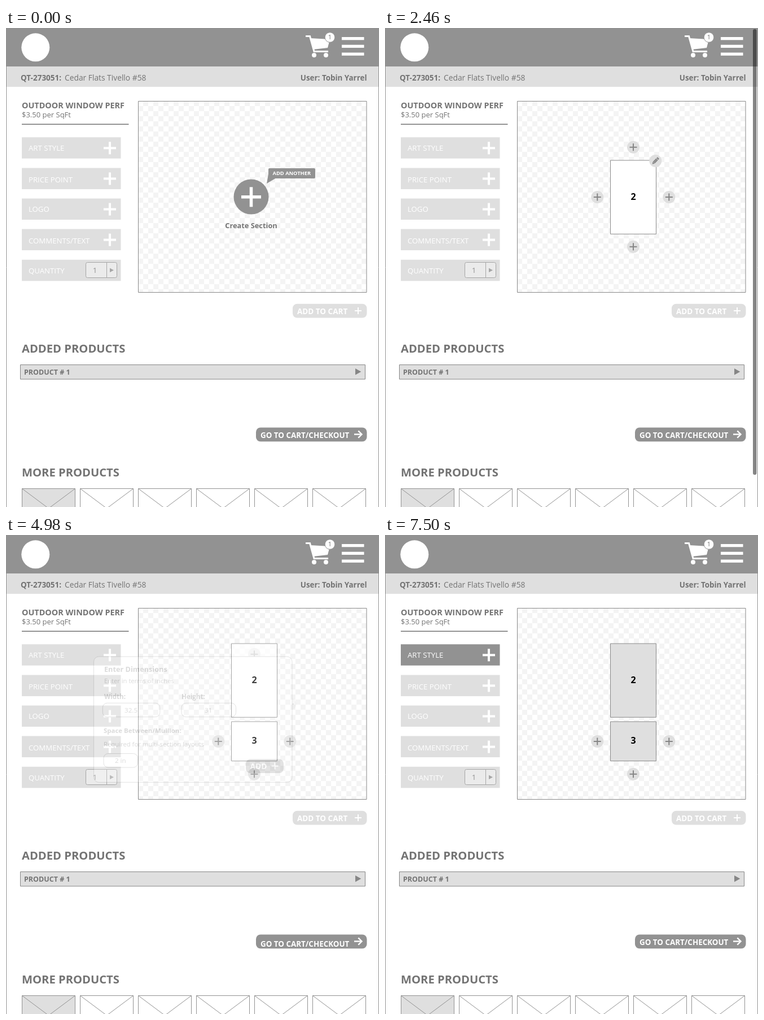
An HTML page with a canvas for the animation above (7.99 s loop, 661 by 847 pixels).

```html
<!DOCTYPE html>
<html lang="en">
<head>
<meta charset="utf-8">
<title>Product builder</title>
<style>
  html, body { margin: 0; width: 100%; height: 100%; overflow: hidden; background: #fff; }
  canvas { display: block; }
</style>
</head>
<body>
<canvas id="stage" width="661" height="847"></canvas>
<script>
const W = 661, H = 847, LOOP = 7990, STEP = 70;
const GREY = '#929292', LIGHT = '#dfdfdf', INK = '#737373', WHITE = '#fff';
const FONT = '"Open Sans", "Noto Sans", sans-serif';
const stage = document.getElementById('stage').getContext('2d');
let c;

// y is the middle of the capital letters
function text(str, x, y, size, { bold = false, color = INK, align = 'left' } = {}) {
  c.font = `${bold ? 700 : 400} ${size}px ${FONT}`;
  c.textAlign = align;
  c.fillStyle = color;
  c.fillText(str, x, y + size * 0.357);
}

function box(x, y, w, h, fill, stroke, r = 0) {
  c.beginPath();
  c.roundRect(x, y, w, h, r);
  if (fill) { c.fillStyle = fill; c.fill(); }
  if (stroke) { c.strokeStyle = stroke; c.lineWidth = 1; c.stroke(); }
}

function disc(x, y, r, fill, stroke) {
  box(x - r, y - r, 2 * r, 2 * r, fill, stroke, r);
}

function shape(points, fill) {
  c.beginPath();
  points.forEach(([x, y]) => c.lineTo(x, y));
  c.closePath();
  c.fillStyle = fill;
  c.fill();
}

function line(points, color, width) {
  c.beginPath();
  points.forEach(([x, y]) => c.lineTo(x, y));
  c.strokeStyle = color;
  c.lineWidth = width;
  c.stroke();
}

function plus(x, y, size, width, color = WHITE) {
  const h = size / 2;
  line([[x - h, y], [x + h, y]], color, width);
  line([[x, y - h], [x, y + h]], color, width);
}

function cart() {
  line([[531, 14.5], [538.5, 14.5], [546, 41.5], [571, 41.5]], WHITE, 3);
  shape([[539, 18], [574, 20], [570, 35], [544, 38]], WHITE);
  disc(546, 48, 4, WHITE);
  disc(567, 48, 4, WHITE);
  disc(574, 16.5, 8.8, WHITE, GREY);
  text('1', 574, 16.5, 11, { align: 'center' });
}

function header() {
  box(0, 0, W, 68, GREY);
  box(0, 68, W, 36, LIGHT);
  disc(52.3, 34.3, 25, WHITE);
  cart();
  for (const y of [16, 29.7, 43.4]) box(595, y, 39.5, 5.3, WHITE);
  text('QT-273051:', 26, 88, 13.5, { bold: true });
  text('Cedar Flats Tivello #58', 104, 88, 13.8);
  text('User: Tobin Yarrel', 639.5, 88, 13.4, { bold: true, align: 'right' });
}

function options(active) {
  text('OUTDOOR WINDOW PERF', 28, 137, 14.4, { bold: true });
  text('$3.50 per SqFt', 28, 153.5, 13);
  line([[28, 170.3], [217.5, 170.3]], INK, 1.6);
  ['ART STYLE', 'PRICE POINT', 'LOGO', 'COMMENTS/TEXT', 'QUANTITY'].forEach((name, i) => {
    const y = 193.3 + i * 54.1;
    box(28, y, 175.5, 37.5, active && i === 0 ? GREY : LIGHT);
    text(name, 40, y + (i % 2 ? 20.5 : 19) + (i === 4 ? 1 : 0), 13.2, { color: WHITE });
    if (i < 4) plus(184, y + 19, 22, 4);
  });
  box(141.5, 414.5, 55, 27, '#ebebeb', '#a6a6a6', 3);
  line([[178.5, 415], [178.5, 441]], '#a6a6a6', 1);
  text('1', 157.5, 428.5, 13.5, { color: GREY, align: 'center' });
  shape([[184, 424.5], [191, 428.3], [184, 432]], '#a6a6a6');
}

function preview() {
  const x0 = 234, y0 = 129, w = 405.5, h = 339, cell = 9;
  c.save();
  c.beginPath();
  c.rect(x0, y0, w, h);
  c.clip();
  c.fillStyle = '#f4f4f4';
  for (let j = 0; j * cell < h; j++)
    for (let i = (j + 1) % 2; i * cell < w; i += 2)
      c.fillRect(x0 + i * cell, y0 + j * cell, cell, cell);
  c.restore();
  box(x0 + 0.5, y0 + 0.5, w - 1, h - 1, null, '#8a8a8a');
}

function lowerPage(labelY) {
  box(508, 487.7, 131.5, 24.8, LIGHT, null, 8);
  text('ADD TO CART', 516, 500.7, 13.5, { bold: true, color: WHITE });
  plus(624, 500, 12, 2);

  text('ADDED PRODUCTS', 28, 567, 20.2, { bold: true });
  box(25.5, 595.5, 611, 25.5, LIGHT, '#868686');
  text('PRODUCT # 1', 32, 609, 12.5, { bold: true });
  shape([[619, 602], [629.3, 607.8], [619, 613.6]], '#868686');

  box(443, 706.5, 196.5, 24.8, GREY, null, 8);
  text('GO TO CART/CHECKOUT', 451, labelY, 13.4, { bold: true, color: WHITE });
  line([[617, 718.5], [630, 718.5]], WHITE, 2.4);
  line([[624.3, 712.3], [630.5, 718.5], [624.3, 724.7]], WHITE, 2.4);

  text('MORE PRODUCTS', 28, 786, 20.2, { bold: true });
  for (let i = 0; i < 6; i++) {
    const x = 28.5 + i * 103, y = 814.5, w = 94, h = 70;
    box(x, y, w, h, i ? WHITE : LIGHT, GREY);
    line([[x, y], [x + w, y + h]], GREY, 1);
    line([[x + w, y], [x, y + h]], GREY, 1);
  }
}

function createPrompt() {
  disc(434.5, 298.5, 31, GREY);
  plus(434.5, 298.8, 35, 5.5);
  text('Create Section', 434.5, 349.5, 12.8, { bold: true, align: 'center' });
  box(465, 248, 83, 18, GREY, null, 2);
  shape([[465.5, 255], [462, 275], [479, 265]], GREY);
  text('ADD ANOTHER', 506.3, 257, 9.3, { bold: true, color: WHITE, align: 'center' });
}

function section(label, y, h, textY, fill) {
  box(399.5, y, 81, h, fill, '#8a8a8a');
  text(label, 440, textY, 16, { bold: true, color: '#000', align: 'center' });
}

function handles(points) {
  for (const [x, y] of points) {
    disc(x, y, 11, LIGHT);
    plus(x, y, 13, 2, '#868686');
  }
}

function pencil(x, y) {
  disc(x, y, 11, LIGHT);
  c.save();
  c.translate(x, y);
  c.rotate(-Math.PI / 4);
  box(-4, -2.3, 8, 4.6, '#868686');
  box(4.8, -2.3, 2.6, 4.6, '#868686', null, 1);
  shape([[-4.4, -2.3], [-8, 0], [-4.4, 2.3]], '#868686');
  line([[-4, 0], [4, 0]], '#b4b4b4', 0.8);
  c.restore();
}

function singleSection() {
  section('2', 234, 130.3, 298.5, WHITE);
  handles([[440, 210.8], [376.3, 299], [503.3, 299], [440, 386.8]]);
  pencil(479.3, 235);
}

function stackedSections(fill) {
  section('2', 192, 130.3, 256, fill);
  section('3', 330, 69.6, 363, fill);
  handles([[376.3, 365], [503.3, 365], [440, 422.8]]);
}

function field(x, y, w, value) {
  box(x, y, w, 24.5, WHITE, GREY, 8);
  text(value, x + w / 2 - 0.5, y + 12.8, 11.6, { align: 'center' });
}

function dialog(height, heightValue, spacing) {
  box(155.5, 215, 351.5, height, WHITE, GREY, 9);
  text('Enter Dimensions', 174, 237.3, 12.7, { bold: true });
  text('Enter in terms of inches', 174, 258, 11.2);
  text('Width:', 174, 285.5, 11.6, { bold: true });
  text('Height:', 311, 285.5, 11.6, { bold: true });
  field(171.3, 297.2, 101.5, '32.5');
  field(311, 297.2, 96.5, heightValue);
  if (spacing) {
    text('Space Between/Mullion:', 173, 346.3, 11.45, { bold: true });
    text('Required for multi-section layouts', 173, 369.5, 11.3);
    field(173, 386.5, 60.5, spacing);
  }
  const y = 215 + height - 41;
  box(425, y, 67, 24.8, GREY, null, 8);
  text('ADD', 432.5, y + 13, 13.8, { bold: true, color: WHITE });
  plus(476.5, y + 12.2, 12, 2);
}

function makeScreen(content, { active = false, labelY = 720.3 } = {}) {
  const canvas = document.createElement('canvas');
  canvas.width = W;
  canvas.height = H;
  c = canvas.getContext('2d');
  box(0, 0, W, H, WHITE);
  header();
  options(active);
  preview();
  lowerPage(labelY);
  content();
  line([[0.5, 0], [0.5, H]], GREY, 1);
  line([[660.5, 0], [660.5, H]], GREY, 1);
  return canvas;
}

const LOW = { labelY: 723.3 };
const screens = [
  makeScreen(createPrompt),
  makeScreen(() => dialog(172.5, '75.5')),
  makeScreen(singleSection),
  makeScreen(() => { singleSection(); dialog(222.3, '31', '2 in'); }, LOW),
  makeScreen(() => stackedSections(WHITE), LOW),
  makeScreen(() => stackedSections(WHITE), { active: true }),
  makeScreen(() => stackedSections(LIGHT), { active: true })
];

// dissolve into screen i + 1: start time, steps
const dissolves = [[500, 4], [1760, 4], [3720, 4], [4840, 5], [6730, 3], [7290, 4]];
// scrollbar: start time, steps, time it disappears
const scrolls = [[2180, 5, 3720], [4140, 6, 4840], [5330, 5, 6730], [7220, 5, 7290]];

function progress(t, start, steps) {
  const k = Math.floor((t - start) / STEP) + 1;
  return Math.max(0, Math.min(1, k / steps));
}

function draw(t) {
  stage.globalAlpha = 1;
  stage.drawImage(screens[0], 0, 0);
  dissolves.forEach(([start, steps], i) => {
    if (t < start) return;
    stage.globalAlpha = 1 - (1 - progress(t, start, steps)) ** 1.5;
    stage.drawImage(screens[i + 1], 0, 0);
  });
  stage.globalAlpha = 1;
  const scroll = scrolls.find(([start, , end]) => t >= start && t < end);
  if (scroll) {
    c = stage;
    box(652, 2, 6.5, 788, `rgba(0,0,0,${0.48 * progress(t, scroll[0], scroll[1])})`, null, 3);
  }
}

const begin = performance.now();
function tick() {
  draw((performance.now() - begin) % LOOP);
  requestAnimationFrame(tick);
}
tick();
</script>
</body>
</html>
```
